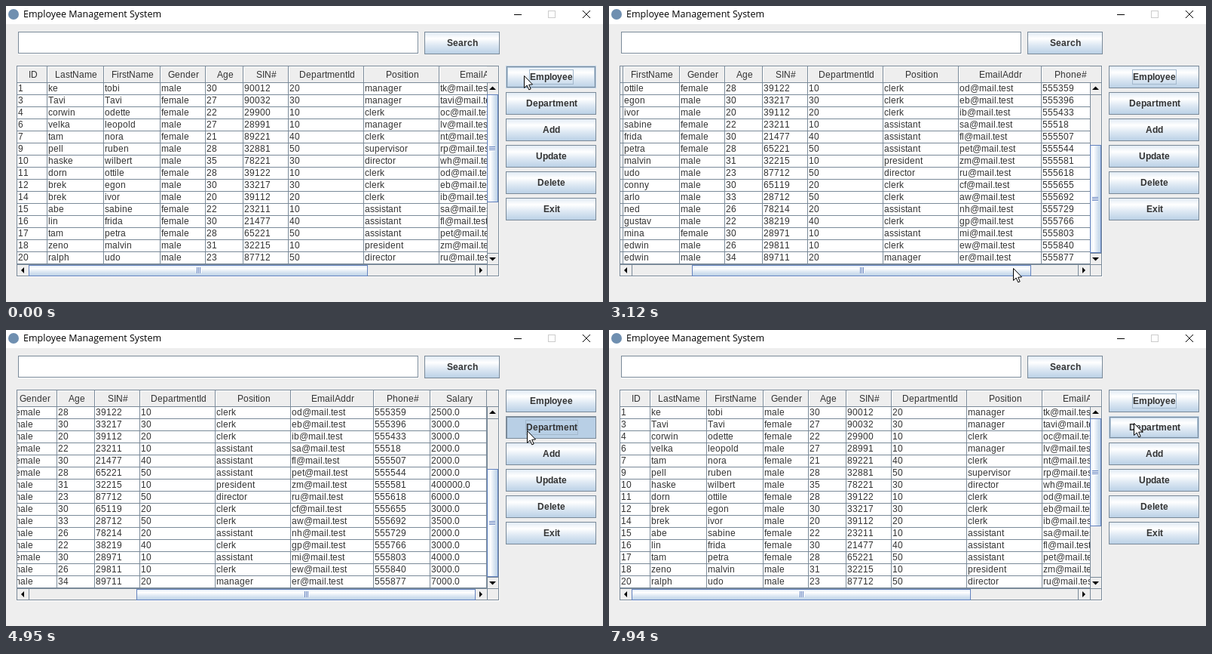
Animation of 792 by 392 pixels, one loop 8000 ms. Source, as an HTML page with a canvas:

```html
<!DOCTYPE html>
<html lang="en">
<head>
<meta charset="utf-8">
<title>Employee Management System</title>
<style>
  html, body { margin: 0; width: 100%; height: 100%; overflow: hidden; background: #eee; }
  canvas { display: block; }
</style>
</head>
<body>
<canvas id="stage" width="792" height="392"></canvas>
<script>
const ctx = document.getElementById('stage').getContext('2d');
const LOOP = 8000;
const PLAIN = '12px "Liberation Sans", Arial, sans-serif';
const BOLD = 'bold ' + PLAIN;
const TITLE = '12.5px "Open Sans", "Noto Sans", sans-serif';
const INK = '#333', PANEL = '#eee', LINE = '#7a8a99', SOFT = '#b8cfe5', BLUE = '#6382bf', OFF = '#999';

// id, last name, first name, gender, age, SIN, department, position, mail user, salary
const staff = `1 ke tobi male 30 90012 20 manager tk 3000
3 Tavi Tavi female 27 90032 30 manager tavi 3000
4 corwin odette female 22 29900 10 clerk oc 3000
6 velka leopold male 27 28991 10 manager lv 3000
7 tam nora female 21 89221 40 clerk nt 3000
9 pell ruben male 28 32881 50 supervisor rp 3000
10 haske wilbert male 35 78221 30 director wh 3000
11 dorn ottile female 28 39122 10 clerk od 2500
12 brek egon male 30 33217 30 clerk eb 3000
14 brek ivor male 20 39112 20 clerk ib 3000
15 abe sabine female 22 23211 10 assistant sa 2000
16 lin frida female 30 21477 40 assistant fl 2000
17 tam petra female 28 65221 50 assistant pet 2000
18 zeno malvin male 31 32215 10 president zm 400000
20 ralph udo male 23 87712 50 director ru 6000
21 fay conny male 30 65119 20 clerk cf 3000
22 wick arlo male 33 28712 50 clerk aw 3500
23 holt ned male 26 78214 20 assistant nh 2000
24 pell gustav male 22 38219 40 clerk gp 3000
25 isko mina female 30 28971 10 assistant mi 4000
26 wick edwin male 26 29811 10 clerk ew 3000
28 ruk edwin male 34 89711 20 manager er 7000`.split('\n').map((line, i) => {
  const cells = line.split(' ');
  const salary = cells.pop() + '.0';
  const user = cells.pop();
  const phone = i === 10 ? '55518' : String(555100 + i * 37);
  return [...cells, user + '@mail.test', phone, salary];
});

const employees = {
  heads: ['ID', 'LastName', 'FirstName', 'Gender', 'Age', 'SIN#', 'DepartmentId', 'Position', 'EmailAddr', 'Phone#', 'Salary'],
  widths: [40, 75, 75, 60, 50, 60, 100, 100, 110, 75, 75],
  rows: staff
};
const departments = {
  heads: ['DepartmentId', 'DepartmentName', 'DepartmentDuty'],
  widths: [212, 213, 213],
  rows: [['IT', 'Tec'], ['HR', 'HR'], ['Marketing', 'Marketing'], ['Sale', 'Sale'], ['President Office', 'President']]
    .map(([name, duty], i) => [String(10 * (i + 1)), name, 'Everything about ' + duty])
};

// Keyframes: time, then values
const pointerPath = [
  [130, 687, 92], [260, 650, 150], [390, 530, 280], [520, 438, 347], [650, 438, 347], [780, 411, 345],
  [910, 450, 300], [1040, 560, 215], [1170, 640, 178], [1300, 642, 189], [1430, 642, 189],
  [1950, 654, 256], [2340, 537, 328], [2470, 490, 342], [2600, 455, 347], [2730, 455, 347],
  [3120, 536, 347], [3640, 594, 351], [4170, 594, 351], [4950, 691, 133], [5080, 691, 133],
  [5600, 700, 243], [5990, 746, 222], [6510, 350, 128], [6640, 342, 124], [6770, 342, 110],
  [6900, 360, 108], [7420, 660, 134], [7680, 696, 95], [7810, 696, 95], [7940, 696, 123]
];
const thumbYPath = [[1430, 0], [1950, 67]];
const thumbXPath = [[2730, 0], [3120, 80.4], [3640, 138], [3770, 141], [4170, 141], [4300, 143]];

function at(path, t) {
  const next = path.findIndex(key => key[0] > t);
  if (next === 0) return path[0].slice(1);
  if (next < 0) return path[path.length - 1].slice(1);
  const a = path[next - 1], b = path[next];
  const k = (t - a[0]) / (b[0] - a[0]);
  return a.slice(1).map((v, i) => v + (b[i + 1] - v) * k);
}

function fill(x, y, w, h, color) {
  ctx.fillStyle = color;
  ctx.fillRect(x, y, w, h);
}
function box(x, y, w, h, color) {
  ctx.strokeStyle = color;
  ctx.lineWidth = 1;
  ctx.strokeRect(x + .5, y + .5, w - 1, h - 1);
}
function polygon(points, color) {
  ctx.beginPath();
  points.forEach(([x, y]) => ctx.lineTo(x, y));
  ctx.closePath();
  ctx.fillStyle = color;
  ctx.fill();
}
function clipped(x, y, w, h, draw) {
  ctx.save();
  ctx.beginPath();
  ctx.rect(x, y, w, h);
  ctx.clip();
  draw();
  ctx.restore();
}

// Swing advances each glyph by whole pixels
const advance = ch => Math.round(ctx.measureText(ch).width);
const textWidth = (s, font) => {
  ctx.font = font;
  return [...s].reduce((sum, ch) => sum + advance(ch), 0);
};
const centred = (s, x, w, font) => x + Math.floor((w - textWidth(s, font)) / 2) + 1;
function text(s, x, y, font = PLAIN, color = INK) {
  ctx.font = font;
  ctx.fillStyle = color;
  for (const ch of s) {
    ctx.fillText(ch, x, y);
    x += advance(ch);
  }
}

function gloss(x0, y0, x1, y1) {
  const g = ctx.createLinearGradient(x0, y0, x1, y1);
  [[0, '#dde8f3'], [.3, '#fff'], [.6, '#dde8f3'], [1, SOFT]].forEach(stop => g.addColorStop(...stop));
  return g;
}

function button(label, x, y, w, { disabled, pressed, hover, focus } = {}) {
  const h = 30;
  fill(x, y, w, h, disabled ? PANEL : pressed ? SOFT : gloss(0, y, 0, y + h));
  box(x, y, w, h, disabled ? OFF : LINE);
  if (pressed) {
    fill(x + 1, y + 1, w - 2, 1, LINE);
    fill(x + 1, y + 1, 1, h - 2, LINE);
  } else if (hover && !disabled) {
    box(x, y, w, h, SOFT);
    box(x + 1, y + 1, w - 2, h - 2, LINE);
    box(x + 2, y + 2, w - 4, h - 4, SOFT);
  }
  const left = centred(label, x, w, BOLD);
  text(label, left, y + 19, BOLD, disabled ? OFF : INK);
  if (focus) box(left - 1, y + 5, textWidth(label, BOLD) + 2, 20, '#a3b8cc');
}

function sunken(x, y, w, h, color) {
  fill(x, y, w, h, '#fff');
  fill(x, y, w - 1, h - 1, LINE);
  fill(x + 1, y + 1, w - 3, h - 3, color);
}

function table({ heads, widths, rows }, viewWidth, dx, dy, selected = -1, focusCell = false) {
  const lefts = widths.map((_, i) => 15 - dx + widths.slice(0, i).reduce((a, b) => a + b, 0));
  clipped(15, 80, viewWidth, 22, () => heads.forEach((head, i) => {
    const x = lefts[i], w = widths[i];
    fill(x, 80, w, 1, '#fff');
    fill(x, 80, 1, 21, '#fff');
    fill(x + w - 1, 80, 1, 22, LINE);
    fill(x, 101, w, 1, LINE);
    text(head, centred(head, x, w, PLAIN), 95);
  }));
  clipped(15, 102, viewWidth, 240, () => rows.forEach((row, r) => {
    const y = 102 + r * 16 - dy;
    row.forEach((cell, c) => {
      const x = lefts[c], w = widths[c];
      fill(x, y, w, 16, LINE);
      fill(x, y, w - 1, 15, r === selected ? SOFT : '#fff');
      clipped(x, y, w - 1, 15, () => text(cell, x + 1, y + 11));
      if (focusCell && r === selected && c === 1) box(x, y, w - 1, 15, BLUE);
    });
  }));
}

function thumb(x, y, w, h, vertical) {
  fill(x, y, w, h, vertical ? gloss(x, 0, x + w, 0) : gloss(0, y, 0, y + h));
  box(x, y, w, h, BLUE);
  const cx = Math.floor(x + w / 2), cy = Math.floor(y + h / 2);
  for (const d of [-2, 0, 2]) {
    if (vertical) {
      fill(cx - 4, cy + d + 1, 8, 1, '#fff');
      fill(cx - 4, cy + d, 8, 1, BLUE);
    } else {
      fill(cx + d + 1, cy - 4, 1, 8, '#fff');
      fill(cx + d, cy - 4, 1, 8, BLUE);
    }
  }
}

function scrollbars(tx, ty) {
  fill(638, 102, 1, 240, LINE);
  fill(15, 342, 638, 1, LINE);
  fill(638, 101, 15, 1, LINE);
  fill(639, 117, 14, 1, LINE);
  fill(639, 327, 14, 1, LINE);
  fill(30, 343, 1, 14, LINE);
  fill(622, 343, 1, 14, LINE);
  fill(638, 342, 1, 15, LINE);
  polygon([[641, 111], [645.5, 106.5], [650, 111]], '#000');
  polygon([[641, 333], [645.5, 337.5], [650, 333]], '#000');
  polygon([[24, 346], [20, 350], [24, 354]], '#000');
  polygon([[628, 346], [632, 350], [628, 354]], '#000');
  thumb(638, 117 + Math.round(ty), 15, 143, true);
  thumb(30 + Math.round(tx), 343, 450, 15, false);
}

function titleBar() {
  fill(0, 0, 792, 24, '#fff');
  ctx.beginPath();
  ctx.arc(10, 11, 7, 0, Math.PI * 2);
  ctx.fillStyle = '#6f8fb0';
  ctx.fill();
  ctx.font = TITLE;
  ctx.fillStyle = '#000';
  ctx.fillText('Employee Management System', 23, 15);
  fill(674, 11, 10, 1, '#000');
  box(719, 6, 10, 10, '#ccc');
  ctx.strokeStyle = '#000';
  ctx.beginPath();
  ctx.moveTo(765, 6);
  ctx.lineTo(775, 16);
  ctx.moveTo(775, 6);
  ctx.lineTo(765, 16);
  ctx.stroke();
}

function pointer(x, y) {
  ctx.save();
  ctx.translate(Math.round(x) + .5, Math.round(y) + .5);
  polygon([[0, 0], [0, 16], [3.7, 12.6], [6.3, 18.4], [8.7, 17.4], [6.2, 11.8], [11, 11.4]], '#fff');
  ctx.strokeStyle = '#000';
  ctx.stroke();
  ctx.restore();
}

function draw(t) {
  const [px, py] = at(pointerPath, t);
  const showDepartments = t >= 5080 && t < 7940;
  const focused = t < 4950 || t >= 7680 ? 'Employee' : t < 6640 ? 'Department' : '';
  const pressed = t >= 4950 && t < 5080 ? 'Department' : t >= 7680 && t < 7940 ? 'Employee' : '';

  fill(0, 0, 792, 392, PANEL);
  titleBar();
  sunken(16, 34, 532, 30, '#fff');
  button('Search', 555, 34, 100);

  sunken(14, 79, 641, 280, PANEL);
  if (showDepartments) {
    table(departments, 638, 0, 0, t >= 6640 ? 1 : -1, t < 7680);
  } else {
    const [tx] = t < 7940 ? at(thumbXPath, t) : [0];
    const [ty] = t < 7940 ? at(thumbYPath, t) : [0];
    table(employees, 623, Math.round(tx * 197 / 143), Math.round(ty * 112 / 67));
    scrollbars(tx, ty);
  }

  ['Employee', 'Department', 'Add', 'Update', 'Delete', 'Exit'].forEach((label, i) => {
    const y = 79 + i * 35;
    button(label, 663, y, 120, {
      disabled: showDepartments && i > 1 && i < 5,
      pressed: label === pressed,
      focus: label === focused,
      hover: px >= 663 && px < 783 && py >= y && py < y + 30
    });
  });
  pointer(px, py);
}

// The screen refreshes every 130 ms, restarting its beat at 4300 ms
function beat(t) {
  const start = t < 4300 ? 0 : 4300;
  return start + Math.floor((t - start) / 130) * 130;
}

let shown = -1;
function tick() {
  const t = beat(performance.now() % LOOP);
  if (t !== shown) draw(shown = t);
  requestAnimationFrame(tick);
}
tick();
</script>
</body>
</html>
```
